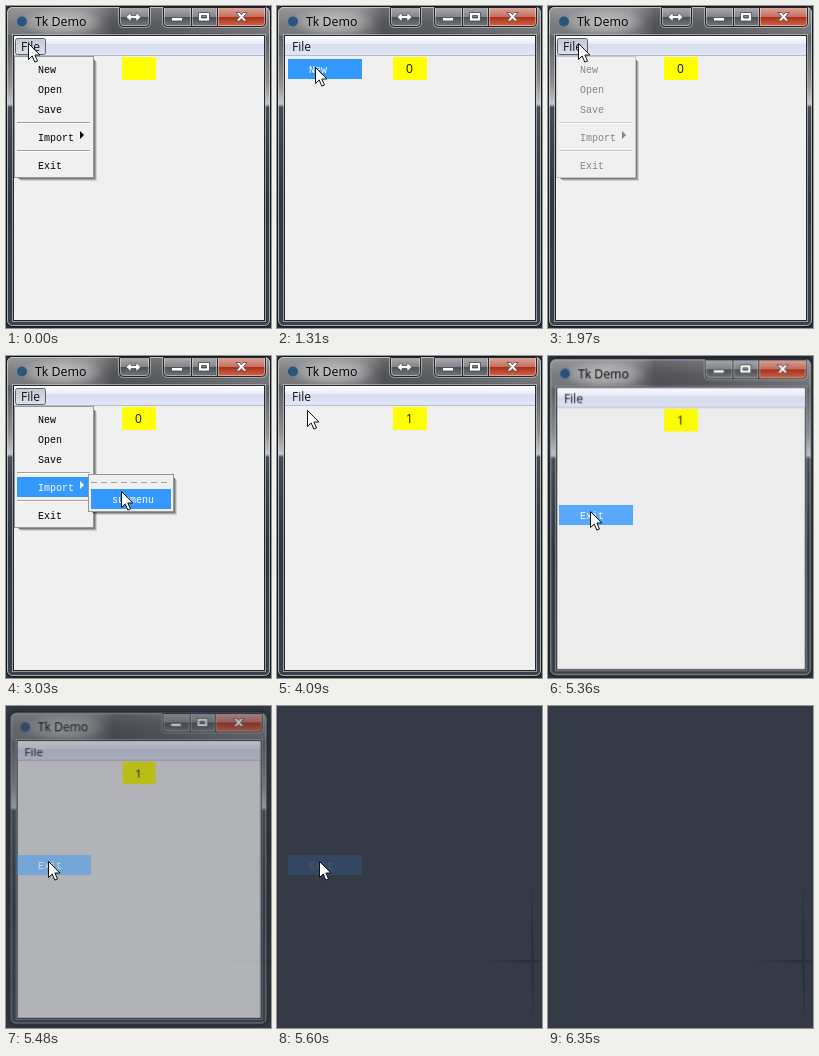
An HTML page that plays this animation: 265x322 px, repeating every 6.5 s.

```html
<!DOCTYPE html>
<html lang="en">
<head>
<meta charset="utf-8">
<title>Tk Demo</title>
<style>
html, body { margin: 0; width: 100%; height: 100%; overflow: hidden; background: #343b47; }
svg { display: block; width: 265px; height: 322px; }
.ui { font: 12px "Open Sans", "Noto Sans", sans-serif; fill: #111; }
.title { font-size: 12.4px; fill: #000; }
.item { font: 10px "Liberation Mono", "Noto Sans Mono", monospace; fill: #000; }
.hot text, .hot .arrow { fill: #fff; }
.hot rect { fill: #39f; }
.panel { fill: #f0f0f0; stroke: #979797; }
.shade { fill: none; stroke: #000; }
.rule { stroke: #a0a0a0; }
.lite { stroke: #fff; }
.halo { fill: none; stroke: #fff; stroke-opacity: .4; }
.frame { filter: drop-shadow(0 0 4px #0a0f14); }

/* One 6.5 s loop; every track holds its value until the next step. */
.window, .resize, .pressed, .menu, .label, .sub, .zero, .one, .hot, .cursor {
  animation: 6.5s step-end infinite;
}
.window { transform-origin: 132.5px 230px; animation-name: window; }
.resize { animation-name: resize; }
.pressed, .menu { animation-name: menu; }
.label { animation-name: label; }
.sub { animation-name: sub; }
.zero { animation-name: zero; }
.one { animation-name: one; }
.new { animation-name: new; }
.save { animation-name: save; }
.import { animation-name: import; }
.submenu { animation-name: submenu; }
.exit { animation-name: exit; }
.cursor { animation-name: cursor; }

@keyframes window {
  0% { transform: none; opacity: 1; }
  82.46% { transform: scale(.991, .99); opacity: .99; }
  84.3% { transform: scale(.972, .974); opacity: .67; }
  86.15%, 100% { transform: scale(.95, .95); opacity: 0; }
}
@keyframes resize { 0% { opacity: 1; } 82.46%, 100% { opacity: 0; } }
@keyframes menu {
  0%, 30.3%, 67.53% { opacity: 1; }
  20.15%, 56%, 80.61%, 100% { opacity: 0; }
}
@keyframes label {
  0%, 32.15%, 69.84%, 100% { opacity: 1; }
  30.3%, 67.53% { opacity: .45; }
}
@keyframes sub { 0%, 56%, 100% { opacity: 0; } 39.53% { opacity: 1; } }
@keyframes zero { 0%, 56%, 100% { opacity: 0; } 20.15% { opacity: 1; } }
@keyframes one { 0%, 100% { opacity: 0; } 56% { opacity: 1; } }
@keyframes new {
  0%, 26.61%, 35.84%, 74%, 100% { opacity: 0; }
  9.23%, 34%, 72.15% { opacity: 1; }
  22.46% { opacity: .6; }
  24.76% { opacity: .2; }
}
@keyframes save {
  0%, 37.69%, 75.84%, 100% { opacity: 0; }
  35.84%, 74% { opacity: 1; }
}
@keyframes import { 0%, 56%, 100% { opacity: 0; } 37.69% { opacity: 1; } }
@keyframes submenu {
  0%, 62.92%, 100% { opacity: 0; }
  46.61% { opacity: 1; }
  58.3% { opacity: .6; }
  60.61% { opacity: .2; }
}
@keyframes exit {
  0%, 88.46%, 100% { opacity: 0; }
  75.84% { opacity: 1; }
  82.46% { opacity: .8; }
  84.3% { opacity: .47; }
  86.15% { opacity: .14; }
}
@keyframes cursor {
  0% { transform: translate(22px, 37px); }
  4.61% { transform: translate(25px, 43px); }
  6.92% { transform: translate(30px, 50px); }
  9.23% { transform: translate(36px, 57px); }
  11.53% { transform: translate(38px, 61px); }
  24.76% { transform: translate(35px, 53px); }
  26.61% { transform: translate(32px, 44px); }
  28.46% { transform: translate(30px, 37px); }
  32.15% { transform: translate(32px, 46px); }
  34% { transform: translate(38px, 64px); }
  35.84% { transform: translate(43px, 98px); }
  37.69% { transform: translate(44px, 130px); }
  39.53% { transform: translate(44px, 133px); }
  46.61% { transform: translate(115px, 135px); }
  48.92% { transform: translate(121px, 141px); }
  51.23% { transform: translate(123px, 144px); }
  58.3% { transform: translate(116px, 136px); }
  60.61% { transform: translate(66px, 88px); }
  62.92% { transform: translate(30px, 54px); }
  65.23% { transform: translate(29px, 43px); }
  67.53% { transform: translate(29px, 40px); }
  72.15% { transform: translate(33px, 58px); }
  74% { transform: translate(39px, 104px); }
  75.84% { transform: translate(42px, 155px); }
  88.46% { transform: translate(52px, 168px); }
  90.76% { transform: translate(88px, 202px); }
  93.07% { transform: translate(138px, 245px); }
  95.38% { transform: translate(190px, 300px); }
  97.69%, 100% { transform: translate(300px, 360px); }
}
</style>
</head>
<body>
<svg viewBox="0 0 265 322">
  <defs>
    <linearGradient id="glass" x2="0" y2="1">
      <stop offset="0" stop-color="#8b8b8d"/>
      <stop offset=".05" stop-color="#6c6d70"/>
      <stop offset=".1" stop-color="#606266"/>
      <stop offset=".24" stop-color="#8e9093"/>
      <stop offset=".305" stop-color="#c4c6c8"/>
      <stop offset=".315" stop-color="#444c55"/>
      <stop offset=".6" stop-color="#2e3842"/>
      <stop offset="1" stop-color="#39434d"/>
    </linearGradient>
    <linearGradient id="sheen">
      <stop offset="0" stop-color="#fff" stop-opacity=".12"/>
      <stop offset=".3" stop-color="#fff" stop-opacity=".15"/>
      <stop offset=".4" stop-color="#000" stop-opacity=".22"/>
      <stop offset=".6" stop-color="#000" stop-opacity=".12"/>
      <stop offset="1" stop-color="#fff" stop-opacity=".1"/>
    </linearGradient>
    <radialGradient id="glow">
      <stop offset="0" stop-color="#e0e0e0" stop-opacity=".7"/>
      <stop offset=".6" stop-color="#d0d0d0" stop-opacity=".4"/>
      <stop offset="1" stop-color="#ccc" stop-opacity="0"/>
    </radialGradient>
    <linearGradient id="bar" x2="0" y2="1">
      <stop offset="0" stop-color="#fff"/>
      <stop offset=".42" stop-color="#e8ecf7"/>
      <stop offset=".45" stop-color="#d7deef"/>
      <stop offset="1" stop-color="#e1e6f6"/>
    </linearGradient>
    <linearGradient id="press" x2="0" y2="1">
      <stop offset="0" stop-color="#c3c8d4"/>
      <stop offset="1" stop-color="#dde1ec"/>
    </linearGradient>
    <linearGradient id="button" x2="0" y2="1">
      <stop offset="0" stop-color="#a9abad"/>
      <stop offset=".48" stop-color="#84868a"/>
      <stop offset=".5" stop-color="#4c4f54"/>
      <stop offset="1" stop-color="#74777b"/>
    </linearGradient>
    <linearGradient id="close" x2="0" y2="1">
      <stop offset="0" stop-color="#dba69b"/>
      <stop offset=".48" stop-color="#c5705f"/>
      <stop offset=".5" stop-color="#a92e18"/>
      <stop offset="1" stop-color="#cf6a4c"/>
    </linearGradient>
    <path id="arrow" class="arrow" d="M74 125l4 4-4 4z"/>
  </defs>

  <rect width="265" height="322" fill="#343b47"/>
  <path d="M255 176l2 78 8 1v1l-8 1-1 60-2-60-50-2 50-1z" fill="#29313d"/>

  <g class="window">
    <rect class="frame" x=".5" y=".5" width="264" height="320" rx="6" fill="url(#glass)" stroke="#15181c"/>
    <rect x="1" y="1" width="263" height="29" rx="5" fill="url(#sheen)"/>
    <rect x="1.5" y="1.5" width="262" height="318" rx="5" fill="none" stroke="#d5d9dc" stroke-opacity=".72"/>
    <ellipse cx="55" cy="16" rx="44" ry="15" fill="url(#glow)"/>
    <circle cx="16" cy="15.5" r="5" fill="#28567f"/>
    <text class="ui title" x="29" y="20">Tk Demo</text>

    <g stroke="#24272b">
      <g class="resize">
        <path d="M113.500 1.500h30v15q0 4-4 4h-22q-4 0-4-4z" fill="url(#button)"/>
        <path class="halo" d="M114.500 2v14.500q0 3 3 3h22q3 0 3-3v-14.500M112.500 2v14.500q0 5 5 5h22q5 0 5-5v-14.500"/>
        <path d="M120 11l5-4.500v3h5v-3l5 4.500-5 4.500v-3h-5v3z" fill="#fff" stroke="#555" stroke-width=".8"/>
      </g>
      <path d="M157.500 1.500h28v19h-24q-4 0-4-4z" fill="url(#button)"/>
      <path d="M185.500 1.500h26v19h-26z" fill="url(#button)"/>
      <path d="M211.500 1.500h48v15q0 4-4 4h-44z" fill="url(#close)"/>
      <path class="halo" d="M158.500 2v14.500q0 3 3 3h23v-17.500M186.500 2v17.500h24v-17.500M212.500 2v17.500h43q3 0 3-3v-14.500M156.500 2v14.500q0 5 5 5h94q5 0 5-5v-14.500"/>
      <g stroke="#444" stroke-width=".8" fill="#fff">
        <path d="M165.500 11.500h11v3.500h-11z"/>
        <path d="M192.500 6.500h11v8.500h-11zm3 3v2.500h5v-2.500z" fill-rule="evenodd"/>
        <path d="M230 6.500h3.500l2 2.300 2-2.300h3.500l-3.600 4.300 3.600 4.200h-3.500l-2-2.300-2 2.300h-3.500l3.600-4.200z"/>
      </g>
    </g>

    <rect x="6.500" y="28.500" width="253" height="287" fill="none" stroke="#c3c7ca" stroke-opacity=".65"/>
    <rect x="7.500" y="29.500" width="251" height="285" fill="#f0f0f0" stroke="#25292e"/>
    <rect x="8" y="30" width="250" height="19" fill="url(#bar)"/>
    <path d="M8 49.500h250" stroke="#b6bccc"/>
    <rect class="pressed" x="9.500" y="32.500" width="30" height="16" rx="2" fill="url(#press)" stroke="#5b606c"/>
    <text class="ui" x="15" y="45">File</text>
    <rect x="116" y="51" width="34" height="23" fill="#ff0"/>
    <text class="ui zero" x="129" y="67">0</text>
    <text class="ui one" x="129" y="67">1</text>
  </g>

  <g class="menu">
    <g class="shade">
      <path d="M88.500 54v118.500h-76" opacity=".5"/>
      <path d="M89.500 55v118.500h-76" opacity=".3"/>
      <path d="M90.500 56v118.500h-76" opacity=".12"/>
    </g>
    <g class="item label">
      <rect class="panel" x="8.500" y="50.500" width="79" height="121"/>
      <path class="rule" d="M11 116.500h73M11 144.500h73"/>
      <path class="lite" d="M11 117.500h73M11 145.500h73"/>
      <text x="32" y="67">New</text>
      <text x="32" y="87">Open</text>
      <text x="32" y="107">Save</text>
      <text x="32" y="135">Import</text>
      <text x="32" y="163">Exit</text>
      <use href="#arrow"/>
    </g>
  </g>

  <g class="item">
    <g class="hot new"><rect x="11" y="53" width="74" height="20"/><text x="32" y="67">New</text></g>
    <g class="hot save"><rect x="11" y="93" width="74" height="20"/><text x="32" y="107">Save</text></g>
    <g class="hot import">
      <rect x="11" y="121" width="74" height="20"/><text x="32" y="135">Import</text>
      <path class="arrow" d="M74 125l4 4-4 4z"/>
    </g>
    <g class="hot exit"><rect x="11" y="149" width="74" height="20"/><text x="32" y="163">Exit</text></g>
    <g class="sub">
      <g class="shade">
        <path d="M168.500 122v34.500h-82" opacity=".5"/>
        <path d="M169.500 123v34.500h-82" opacity=".3"/>
        <path d="M170.500 124v34.500h-82" opacity=".12"/>
      </g>
      <rect class="panel" x="82.500" y="118.500" width="85" height="37"/>
      <path class="rule" d="M85 126.500h80" stroke-dasharray="6 4"/>
      <text x="106" y="147">submenu</text>
    </g>
    <g class="hot submenu"><rect x="85" y="133" width="80" height="20"/><text x="106" y="147">submenu</text></g>
  </g>

  <path class="cursor" d="M.5.5v16l3.700-3.500 2.600 6.100 2.700-1.100-2.600-6h5z" fill="#fff" stroke="#111"/>
</svg>
</body>
</html>
```
